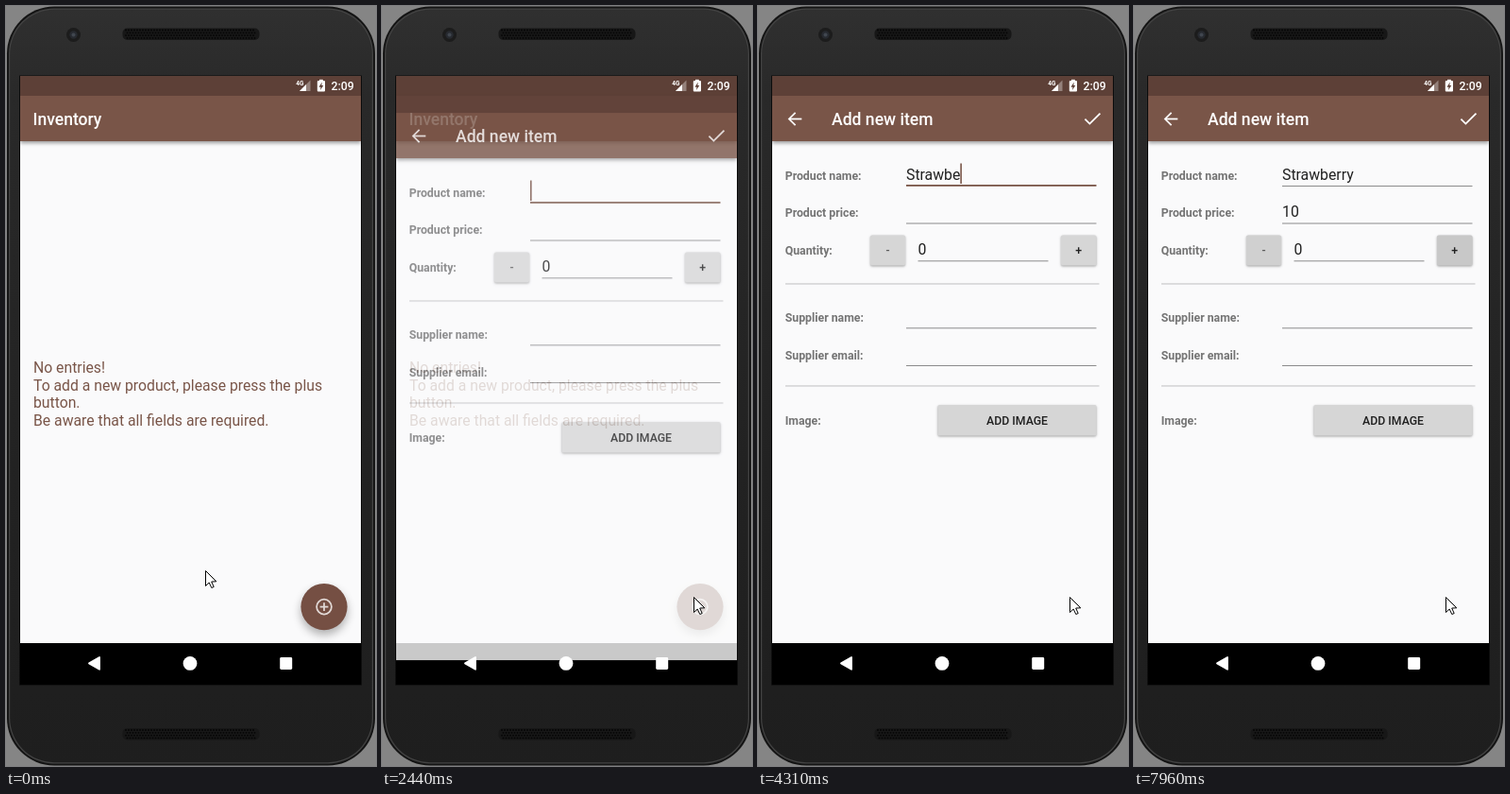
Recreate the animation shown at these times as an HTML page with a canvas. Size 392x804 px, loop 8 s.

```html
<!DOCTYPE html>
<html lang="en">
<head>
<meta charset="utf-8">
<title>Inventory</title>
<style>
  html, body { margin: 0; width: 100%; height: 100%; overflow: hidden; background: #858585; }
  canvas { display: block; }
</style>
</head>
<body>
<canvas id="stage" width="392" height="804"></canvas>
<script>
const W = 392, H = 804, LOOP = 8000;
const SCREEN = { x: 15, y: 74, w: 361, h: 644, navY: 674 };
const BROWN = '#795548', DARK_BROWN = '#5d4037', PAPER = '#fafafb';
const stage = document.getElementById('stage').getContext('2d');

const layer = () => {
  const canvas = document.createElement('canvas');
  canvas.width = W;
  canvas.height = H;
  return canvas.getContext('2d');
};
const clamp = v => Math.max(0, Math.min(1, v));
const progress = (t, from, to) => clamp((t - from) / (to - from));
const mix = (a, b, p) => a + (b - a) * p;
const smooth = p => p * p * (3 - 2 * p);

// Linear interpolation through [time, value] pairs.
function track(t, keys) {
  if (t <= keys[0][0]) return keys[0][1];
  for (let i = 1; i < keys.length; i++) {
    const [t0, v0] = keys[i - 1], [t1, v1] = keys[i];
    if (t <= t1) return mix(v0, v1, (t - t0) / (t1 - t0));
  }
  return keys[keys.length - 1][1];
}

function rect(c, x, y, w, h, color) {
  c.fillStyle = color;
  c.fillRect(x, y, w, h);
}
function round(c, x, y, w, h, r, color) {
  c.fillStyle = color;
  c.beginPath();
  c.roundRect(x, y, w, h, r);
  c.fill();
}
function disc(c, x, y, r, color) {
  c.fillStyle = color;
  c.beginPath();
  c.arc(x, y, r, 0, 7);
  c.fill();
}
function poly(c, points, color) {
  c.fillStyle = color;
  c.beginPath();
  points.forEach(([x, y]) => c.lineTo(x, y));
  c.closePath();
  c.fill();
}
function line(c, points, color, width) {
  c.strokeStyle = color;
  c.lineWidth = width;
  c.beginPath();
  points.forEach(([x, y], i) => i ? c.lineTo(x, y) : c.moveTo(x, y));
  c.stroke();
}
function text(c, str, x, y, size, weight, color, align = 'left') {
  c.font = `${weight} ${size}px Roboto, sans-serif`;
  c.textAlign = align;
  c.fillStyle = color;
  c.fillText(str, x, y);
}
function withShadow(c, alpha, blur, dy, draw) {
  c.save();
  c.shadowColor = `rgba(0,0,0,${alpha})`;
  c.shadowBlur = blur;
  c.shadowOffsetY = dy;
  draw();
  c.restore();
}

function speaker(c, y) {
  round(c, 123.5, y, 145, 12.5, 5, '#171717');
  for (let row = 0; row < 4; row++)
    for (let col = 0; col < 46; col++)
      disc(c, 127 + col * 3 + (row % 2) * 1.5, y + 2 + row * 2.8, 0.9, '#050505');
}

function drawPhone(c) {
  rect(c, 0, 0, W, H, '#858585');
  const body = c.createLinearGradient(0, 0, 0, H);
  body.addColorStop(0, '#303030');
  body.addColorStop(0.12, '#292929');
  body.addColorStop(0.6, '#222222');
  body.addColorStop(1, '#1e1e1e');
  round(c, 1, 0.5, 390, 803, 50, '#141414');
  round(c, 3, 2.5, 386, 799, 48, '#434343');
  round(c, 4.2, 3.8, 383.6, 796.4, 47, body);
  speaker(c, 23.5);
  speaker(c, 764);
  disc(c, 71.5, 30.5, 7.5, '#1c1c1c');
  disc(c, 71.5, 30.5, 4.2, '#272a30');
  disc(c, 71.5, 30.5, 2, '#40464f');
  rect(c, 14, 73.5, 363, 645, '#0c0c0c');
}

function drawWindow(c) {
  rect(c, SCREEN.x, 74, SCREEN.w, 600, PAPER);
  withShadow(c, 0.4, 4, 1.5, () => rect(c, SCREEN.x, 95, SCREEN.w, 48, BROWN));
  rect(c, SCREEN.x, 74, SCREEN.w, 21, DARK_BROWN);
}

function drawFab(c, t) {
  const x = 337, y = 635.6, r = 24.6;
  const lift = progress(t, 1720, 1830) * (1 - progress(t, 2100, 2250));
  withShadow(c, 0.3, 10 + 6 * lift, 5 + 3 * lift, () => disc(c, x, y, r, '#754f43'));
  const fade = 1 - progress(t, 2020, 2330);
  if (t >= 1720 && fade > 0) {
    const grow = progress(t, 1720, 2020);
    c.save();
    c.beginPath();
    c.arc(x, y, r, 0, 7);
    c.clip();
    disc(c, mix(330, x, grow), mix(625, y, grow), mix(6, 27, grow), `rgba(255,255,255,${0.2 * fade})`);
    c.restore();
  }
  c.strokeStyle = '#e2d9d6';
  c.lineWidth = 1.75;
  c.beginPath();
  c.arc(x, y, 7.9, 0, 7);
  c.stroke();
  line(c, [[x - 4.4, y], [x + 4.4, y]], '#e2d9d6', 1.75);
  line(c, [[x, y - 4.4], [x, y + 4.4]], '#e2d9d6', 1.75);
}

function drawList(c, t) {
  drawWindow(c);
  text(c, 'Inventory', 28.5, 126, 17.56, 500, '#fff');
  const message = [
    'No entries!',
    'To add a new product, please press the plus',
    'button.',
    'Be aware that all fields are required.'
  ];
  message.forEach((s, i) => text(c, s, 29, 388 + i * 18.5, 15.75, 400, BROWN));
  drawFab(c, t);
}

function field(c, x, right, y, value, focused, caret) {
  if (focused) rect(c, x, y - 1, right - x, 1.8, BROWN);
  else rect(c, x, y, right - x, 1, '#8c8c8c');
  text(c, value, x, y - 6.5, 15.8, 400, '#212121');
  if (caret) rect(c, x + c.measureText(value).width, y - 23.5, 1.6, 21.5, BROWN);
}
function button(c, x, y, w, h, label, shade, color) {
  withShadow(c, 0.35, 2.5, 1, () => round(c, x, y, w, h, 1.8, `rgb(${shade},${shade},${shade})`));
  text(c, label, x + w / 2, y + h / 2 + 4.3, 12.3, 500, color, 'center');
}
function divider(c, y) {
  rect(c, 29, y, 332.5, 1.5, '#d3d3d4');
}

const nameTimes = [3100, 3440, 3650, 3720, 3960, 4170, 4310, 4550, 4680, 4890];
const priceTimes = [6440, 6680];
const typed = (str, times, t) => str.slice(0, times.filter(at => t >= at).length);

function drawForm(c, t) {
  drawWindow(c);
  line(c, [[46.3, 119.5], [33, 119.5]], '#fff', 1.75);
  line(c, [[39.6, 112.8], [32.9, 119.5], [39.6, 126.2]], '#fff', 1.75);
  text(c, 'Add new item', 78, 126, 17.56, 500, '#fff');
  line(c, [[346.4, 119.7], [351.4, 124.6], [362.5, 113.6]], '#fff', 1.75);

  const labels = [['Product name:', 183.7], ['Product price:', 223.2], ['Quantity:', 263],
    ['Supplier name:', 333.7], ['Supplier email:', 373.5], ['Image:', 442.5]];
  labels.forEach(([s, y]) => text(c, s, 28.7, y, 12.3, 700, '#747474'));

  const onName = t < 5310, onPrice = !onName && t < 7000;
  const blink = (t >= 2860 && t < 3100) || (t >= 5790 && t < 6270);
  field(c, 157, 358.5, 190, typed('Strawberry', nameTimes, t), onName, onName && !blink);
  field(c, 157, 358.5, 229.5, typed('10', priceTimes, t), onPrice, onPrice && !blink);
  field(c, 169.5, 307.5, 269.3, '0', false, false);
  field(c, 157, 358.5, 340.3, '', false, false);
  field(c, 157, 358.5, 380, '', false, false);
  divider(c, 293.2);
  divider(c, 401.2);

  const minus = track(t, [[6965, 214], [7170, 200], [7645, 200], [7960, 208]]);
  const plus = track(t, [[7645, 214], [7960, 200]]);
  button(c, 119, 242.5, 37, 32, '-', Math.round(minus), '#5c5c5c');
  button(c, 321, 242.5, 37.5, 32, '+', Math.round(plus), '#212121');
  button(c, 190.5, 422, 168, 32.5, 'ADD IMAGE', 214, '#212121');
}

function drawSystemIcons(c) {
  text(c, '4G', 307.3, 83.5, 6.5, 700, '#fff');
  poly(c, [[322.5, 78.5], [322.5, 90], [311, 90]], 'rgba(255,255,255,.35)');
  poly(c, [[318, 83], [318, 90], [311, 90]], '#fff');
  round(c, 329.8, 79, 8.2, 11.5, 1, '#fff');
  rect(c, 332, 77.8, 3.8, 2, '#fff');
  poly(c, [[334.8, 80.6], [331.5, 85.8], [333.5, 85.8], [333, 89], [336.3, 84], [334.3, 84]], DARK_BROWN);
  text(c, '2:09', 368.7, 89, 12.3, 500, '#fff', 'right');

  c.lineJoin = 'round';
  poly(c, [[88, 695.4], [99, 689], [99, 701.8]], '#fff');
  c.strokeStyle = '#fff';
  c.lineWidth = 1.8;
  c.stroke();
  c.lineJoin = 'miter';
  disc(c, 195, 695.4, 7.4, '#fff');
  round(c, 290.2, 689, 13, 13, 1.4, '#fff');
}

function drawCursor(c, t) {
  const steps = t < 790 ? 0 : Math.min(10, Math.floor((t - 790) / 34.4) + 1);
  const p = smooth(steps / 10);
  c.save();
  c.translate(Math.round(mix(211, 330, p)) + 0.5, Math.round(mix(597, 625, p)) + 0.5);
  poly(c, [[0, 0], [0, 16], [3.7, 12.5], [6.3, 18], [8.7, 17], [6.2, 11.5], [11.3, 11.3]], '#fff');
  c.strokeStyle = '#000';
  c.lineWidth = 1;
  c.stroke();
  c.restore();
}

const phone = layer(), form = layer();
drawPhone(phone);

const slide = [[2370, 32], [2440, 18.3], [2480, 8], [2510, 0]];
const fadeIn = [[2370, 0.5], [2440, 0.8], [2480, 0.92], [2510, 0.97], [2550, 1]];

function render(t) {
  const c = stage;
  c.drawImage(phone.canvas, 0, 0);
  c.save();
  c.beginPath();
  c.rect(SCREEN.x, SCREEN.y, SCREEN.w, SCREEN.h);
  c.clip();
  if (t < 2550) drawList(c, t);
  rect(c, SCREEN.x, SCREEN.navY, SCREEN.w, 44, '#000');
  if (t >= 2370) {
    form.clearRect(0, 0, W, H);
    form.save();
    form.beginPath();
    form.rect(SCREEN.x, SCREEN.y, SCREEN.w, 600);
    form.clip();
    drawForm(form, t);
    form.restore();
    c.globalAlpha = track(t, fadeIn);
    c.drawImage(form.canvas, 0, track(t, slide));
    c.globalAlpha = 1;
  }
  // The status strip stays fixed while the new window slides.
  drawSystemIcons(c);
  c.restore();
  drawCursor(c, t);
}

const start = performance.now();
function tick() {
  render((performance.now() - start) % LOOP);
  requestAnimationFrame(tick);
}
tick();
</script>
</body>
</html>
```
